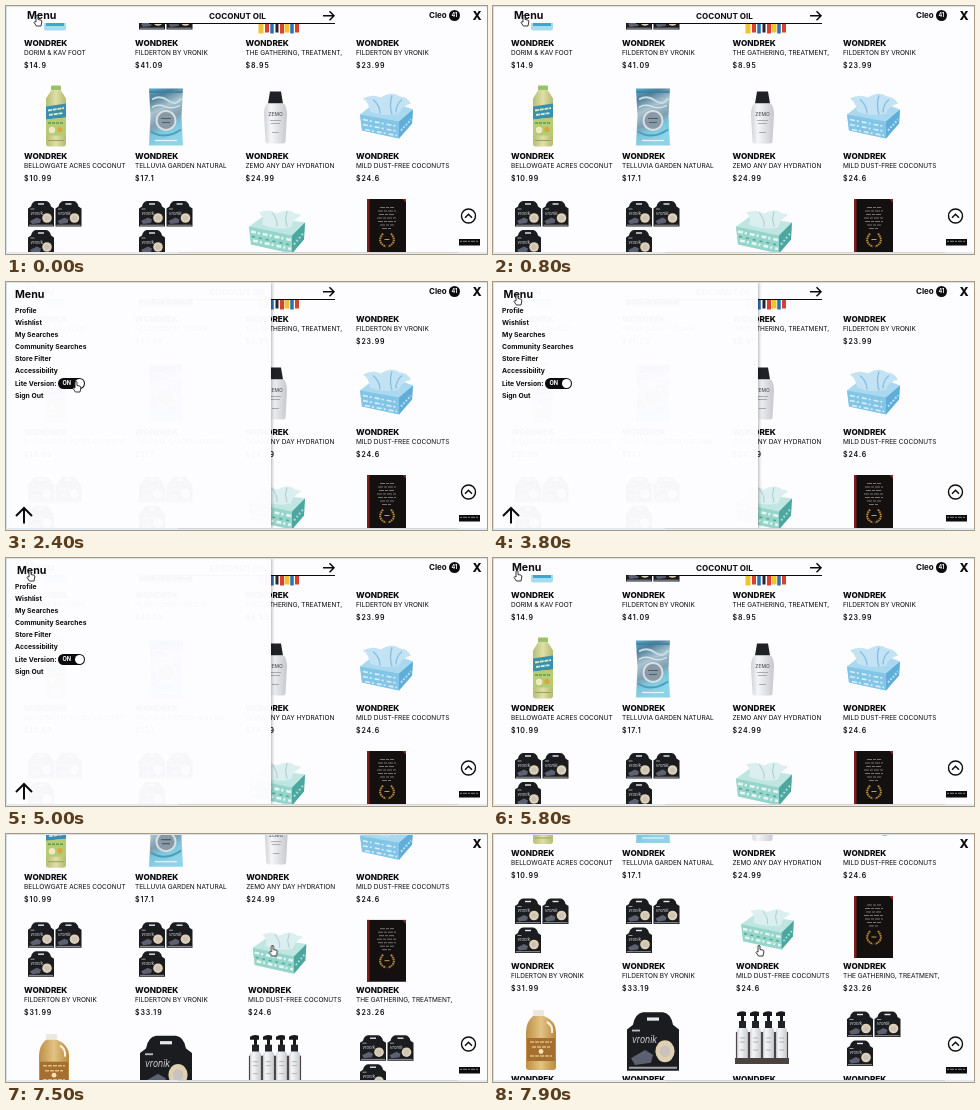
Write an HTML page that moves like this. It is 481 px wide and 248 px high and loops after 8000 ms.

```html
<!DOCTYPE html>
<html lang="en">
<head>
<meta charset="utf-8">
<title>Shop search</title>
<style>
@property --h { syntax: "<number>"; inherits: true; initial-value: 0; }
html, body { margin: 0; width: 100%; height: 100%; overflow: hidden; background: #fdfcfe; }
body { position: relative; font: 700 8px/10px Inter, Arial, sans-serif; color: #0b0b0d; white-space: nowrap; }
body *, .defs { position: absolute; }
svg { overflow: visible; }
svg * { position: static; }
.line { fill: none; stroke: #0b0b0d; stroke-width: 1.5; }

/* products */
#grid { inset: 0; animation: scroll 8s linear infinite; }
.card { width: 111px; height: 100px; transform: translateX(calc(var(--h) * 3.5px)); }
.card svg { left: 0; top: 0; width: 62px; height: 62px; transform: scale(calc(1 - var(--h) * .06)); }
.shop { top: 64px; font-size: 8.2px; font-weight: 800; }
.item { top: 74px; font-size: 6.5px; font-weight: 400; }
.price { top: 87px; font-size: 7px; font-weight: 600; letter-spacing: .85px; }
.hover-a { animation: hoverA 8s ease infinite; }
.hover-b { animation: hoverB 8s ease infinite; }
.hover-c { animation: hoverC 8s ease infinite; }
@keyframes scroll {
  0%, 88.1% { transform: translateY(.5px); }
  88.75% { transform: translateY(-10px); animation-timing-function: cubic-bezier(.3, .5, .6, 1); }
  97.5%, 100% { transform: translateY(-130px); }
}
@keyframes hoverA { 0%, 81.25% { --h: 0; } 83.75%, 85% { --h: 1; } 88.75% { --h: .28; } 90%, 100% { --h: 0; } }
@keyframes hoverB { 0%, 85% { --h: 0; } 88.5%, 91.5% { --h: 1; } 96%, 100% { --h: 0; } }
@keyframes hoverC { 0%, 92% { --h: 0; } 96%, 100% { --h: 1; } }

/* header */
#head { left: 0; right: 0; top: 0; height: 17px; background: #fdfcfe; animation: head 8s ease-in-out infinite; }
.menu { font-size: 10.6px; line-height: 12px; }
#head .menu { left: 18px; top: 4px; animation: nudge 8s ease infinite; }
#query { left: 143px; width: 186px; height: 13px; top: 3.5px; border-bottom: 1.5px solid #0b0b0d; }
#query span { left: 60px; top: 1px; font-size: 8.1px; }
#user { left: 423px; top: 4px; }
#count { left: 443px; top: 3.5px; width: 11px; height: 11px; border-radius: 50%; background: #0b0b0d; color: #fff; font-size: 5.5px; line-height: 11px; text-align: center; }
#close { left: 466.5px; top: 3.6px; font-size: 12px; line-height: 12px; font-weight: 800; }
@keyframes head { 0%, 89.4% { transform: none; } 92.5%, 100% { transform: translateY(-22px); } }
@keyframes nudge {
  0%, 18% { transform: translateX(3px); }
  20%, 72.5% { transform: translateX(1px); }
  75%, 100% { transform: none; }
}

/* side panel */
#panel { left: -4px; top: 0; bottom: 0; width: 0; overflow: hidden; background: rgba(253, 252, 255, .975); box-shadow: 1px 0 3px rgba(0, 0, 0, .3); animation: panel 8s ease-in-out infinite; }
#inner { left: 4px; top: 0; width: 265px; height: 248px; animation: inner 8s ease-in-out infinite; }
#inner .menu { left: 9px; top: 6.5px; animation: poke 8s ease infinite; }
#links { left: 9px; top: 23px; font-size: 6.8px; line-height: 12.1px; white-space: pre; }
#toggle { left: 52px; top: 96px; width: 27px; height: 11px; border-radius: 6px; background: #0b0b0d; color: #fff; font-size: 5.6px; line-height: 11.4px; text-indent: 4.5px; }
#toggle i { right: 1px; top: 1px; width: 9px; height: 9px; border-radius: 50%; background: #fff; }
@keyframes panel { 0%, 17.25% { width: 0; } 23.5%, 66.25% { width: 269px; } 72.5%, 100% { width: 0; } }
@keyframes inner {
  0%, 17.25% { transform: translateX(-24px); }
  23.5%, 66.25% { transform: none; }
  72.5%, 100% { transform: translateX(-24px); }
}
@keyframes poke { 0%, 46.25% { transform: none; } 48.75%, 100% { transform: translateX(2px); } }

/* window edges */
.edge { background: #cfe1ec; }

/* pointer */
#pointer { left: 0; top: 0; animation: move 8s ease-in-out infinite; }
#pointer path { fill: #fff; stroke: #222; stroke-width: .9; stroke-linejoin: round; }
#hand { animation: hand 8s step-end infinite; }
#arrow { animation: arrow 8s step-end infinite; }
@keyframes move {
  0%, 18.75% { transform: translate(32px, 15px); }
  20% { transform: translate(33px, 14px); }
  28.75%, 37.5% { transform: translate(71px, 105px); }
  46.25%, 73.75% { transform: translate(25px, 18px); }
  82.5% { transform: translate(160px, 110px); }
  86.5% { transform: translate(268px, 117px); }
  100% { transform: translate(267px, 117px); }
}
@keyframes hand { 0% { opacity: 1; } 17.5% { opacity: 0; } 28% { opacity: 1; } 37.5% { opacity: 0; } 45% { opacity: 1; } 75% { opacity: 0; } 81.25%, 100% { opacity: 1; } }
@keyframes arrow { 0% { opacity: 0; } 17.5% { opacity: 1; } 28% { opacity: 0; } 37.5% { opacity: 1; } 45% { opacity: 0; } 75% { opacity: 1; } 81.25%, 100% { opacity: 0; } }
</style>
</head>
<body>
<svg class="defs" width="0" height="0">
  <defs>
    <linearGradient id="foil" x2=".3" y2="1">
      <stop offset="0" stop-color="#58a9c8"/><stop offset=".2" stop-color="#4f7f98"/><stop offset=".42" stop-color="#a9c3cf"/>
      <stop offset=".65" stop-color="#7f9fb0"/><stop offset=".8" stop-color="#7cc6dd"/><stop offset="1" stop-color="#8fd3e8"/>
    </linearGradient>
    <linearGradient id="cream">
      <stop offset="0" stop-color="#cfd1d5"/><stop offset=".3" stop-color="#f6f6f8"/><stop offset="1" stop-color="#c6c8cd"/>
    </linearGradient>
    <linearGradient id="oil">
      <stop offset="0" stop-color="#b5bd72"/><stop offset=".5" stop-color="#dfdfa8"/><stop offset="1" stop-color="#b3ba70"/>
    </linearGradient>
    <linearGradient id="gold">
      <stop offset="0" stop-color="#bd8f45"/><stop offset=".5" stop-color="#e2c383"/><stop offset="1" stop-color="#b98a40"/>
    </linearGradient>

    <g id="pack">
      <path d="M3 6Q4 1 8 .5H18Q22 1 23 6L26 8V26H0V8Z" fill="#1b1c20"/>
      <path d="M10 3.5H16" stroke="#e8e8ea" stroke-width="1.4"/>
      <path d="M2.5 8.5h4" stroke="#b9bbc0" stroke-width=".8"/>
      <text x="2.5" y="14" font-size="4.3" font-style="italic" font-weight="400" fill="#ced0d5">vronik</text>
      <circle cx="19" cy="17.5" r="4.8" fill="#dfd0b2"/>
      <circle cx="19" cy="17.5" r="2.6" fill="#c9c2bd"/>
      <path d="M2 20.5 9 17 13 19 12 22.5 4 23.5Z" fill="#5c6070"/>
      <path d="M1 24.7H25" stroke="#a4a6ac" stroke-width=".9"/>
    </g>
    <g id="packs"><use href="#pack" x="4" y="1"/><use href="#pack" x="31.5" y="1"/><use href="#pack" x="4" y="30"/></g>
    <g id="packs4"><use href="#packs"/><use href="#pack" x="31.5" y="30"/></g>
    <use id="bigpack" href="#pack" transform="translate(5 1) scale(2 2.3)"/>

    <g id="bottle">
      <rect x="27" y="-1" width="10" height="5" rx="1" fill="#9cc266"/>
      <path d="M27 4H37L42 12V57Q42 60 39 60H25Q22 60 22 57V12Z" fill="url(#oil)"/>
      <path d="M22 20 42 17V31L22 33Z" fill="#3a8fae"/>
      <path d="M22 33 42 31V49H22Z" fill="#b5cc72"/>
      <path d="M24 24 40 21.5M25 28.5 39 26.5" stroke="#d9ecc0" stroke-width="1.8" stroke-dasharray="4 .8"/>
      <path d="M24 36.5H40" stroke="#5c9a4c" stroke-width="1.5" stroke-dasharray="3 1"/>
      <circle cx="28" cy="43.5" r="3.2" fill="#f0e9c4"/><circle cx="36" cy="43" r="2.6" fill="#dba63f"/>
      <path d="M24 54H40" stroke="#98a456"/>
    </g>
    <g id="pouch">
      <path d="M14 2H48L46.5 30 48 59H14L15.5 30Z" fill="url(#foil)"/>
      <path d="M14.5 5.5H47.5" stroke="#357fa2" stroke-width="1.6"/>
      <path d="M17 13Q25 8 33 14T46 12" fill="none" stroke="#c8dde6" stroke-width="2"/>
      <path d="M17 21Q23 17 30 20T45 19" fill="none" stroke="#dceaf0" stroke-width="1.2"/>
      <circle cx="31" cy="34" r="9.5" fill="#8a99a6" stroke="#d9dfe2" stroke-width="2"/>
      <path d="M26 32H36M27 36H35" stroke="#4d5d6b" stroke-width="1.2"/>
      <path d="M16 45Q30 54 46 43" fill="none" stroke="#4c9dbb" stroke-width="2"/>
      <path d="M20 54H42" stroke="#e5f5fa" stroke-width="1.2"/>
    </g>
    <g id="lotion">
      <path d="M24 5H35L37 17H22Z" fill="#202126"/>
      <path d="M21 17H38Q41 21 41 28L39.5 55Q39.5 57 37 57H22Q19.5 57 19.5 55L18 28Q18 21 21 17Z" fill="url(#cream)"/>
      <text x="29.5" y="29" text-anchor="middle" font-size="5" font-weight="500" fill="#55575d">ZEMO</text>
      <path d="M24 34H35M25 37H34M26 46H33" stroke="#999ca3" stroke-width=".8"/>
    </g>
    <g id="tissues">
      <path d="M4 28 14 20 44 18 57 23 56 37 43 52 6 44Z" fill="#a9d8ef"/>
      <path d="M4 28 43 35 43 52 6 44Z" fill="#82c5e7"/>
      <path d="M43 35 57 23 56 37 43 52Z" fill="#5fadd9"/>
      <path d="M14 25Q13 16 7 12 16 7 25 11 36 4 44 10 51 10 55 17 46 19 43 27 28 31 14 25Z" fill="#c3e2f3"/>
      <path d="M17 13Q24 19 24 27M36 9Q33 18 36 28M46 13Q40 18 40 26" fill="none" stroke="#86bfe0" stroke-width="1.3"/>
      <path d="M7 33 42 40M7 38 42 45M9 43 41 49" stroke="#d9eef9" stroke-width="1.6" stroke-dasharray="5 2 2 3"/>
      <path d="M45 44 55 33" stroke="#b9def1" stroke-width="2" stroke-dasharray="2 1.5"/>
    </g>
    <g id="teabox">
      <path d="M3 27 17 17 59 23 58 40 46 54 5 45Z" fill="#bfe6e0"/>
      <path d="M3 27 46 36 46 54 5 45Z" fill="#96d5cb"/>
      <path d="M46 36 59 23 58 40 46 54Z" fill="#4ba79f"/>
      <path d="M16 25Q19 18 13 13 24 9 31 14 43 8 49 14 54 14 55 16 47 20 45 28 30 31 16 25Z" fill="#dbeef0"/>
      <path d="M26 13Q32 20 31 27M41 12Q38 19 41 27" fill="none" stroke="#a9cdd2"/>
      <path d="M5 32 45 40.5M7 41 45 49.5" stroke="#e4f6ef" stroke-width="2.6" stroke-dasharray="5 2 2 3"/>
      <path d="M6 37 45 45.5" stroke="#4fa892" stroke-width="1.4" stroke-dasharray="3 4"/>
      <path d="M48 45 57 34" stroke="#a9dcd3" stroke-width="2" stroke-dasharray="2 2"/>
    </g>
    <g id="book">
      <path d="M11-1H50V61H11Z" fill="#14100f"/><path d="M11-1H13.5V61H11Z" fill="#7a211c"/>
      <path d="M46-1H50V3Z" fill="#8c2a22"/>
      <path d="M24 8H38M22 11.5H40M23 15H39M21 18.5H41M22 22H40M24 25.5H38M26 29H36" stroke="#77716f" stroke-width="1" stroke-dasharray="5 1 3 1"/>
      <path d="M27 34Q20 43 30 47M35 34Q42 43 32 47" fill="none" stroke="#b98a3c" stroke-width="2" stroke-dasharray="1.6 .7"/>
      <path d="M28.5 40H33.5" stroke="#c59b52"/>
    </g>
    <g id="jug">
      <rect x="22" y="0" width="11" height="6" rx="1" fill="#ece8df"/>
      <path d="M22 6H33Q45 11 45 22V57Q45 60 42 60H18Q15 60 15 57V22Q15 12 22 6Z" fill="url(#gold)"/>
      <path d="M36 12Q42 15 41 23" fill="none" stroke="#fbf4e2" stroke-width="2"/>
      <rect x="16" y="28" width="28" height="23" fill="#a5702f"/>
      <path d="M19 32H41M21 37H39M19 46H41" stroke="#e0bd7d" stroke-width="1.4" stroke-dasharray="4 1"/>
      <circle cx="30" cy="41.5" r="2.4" fill="#f2e4b8"/>
    </g>
    <g id="pump">
      <path d="M1 3Q5 0 10 2V6H8V13H5V6H1Z" fill="#17181b"/><rect x="3" y="11" width="7" height="7" fill="#222328"/>
      <path d="M2 18H11L12.5 22V49H.5V22Z" fill="url(#cream)"/>
      <path d="M.5 22V50M12.5 22V50" stroke="#4c4745" stroke-width="1.2"/>
      <path d="M4 28H9M4 32H9M4 40H9" stroke="#a5a6aa" stroke-width=".8"/>
    </g>
    <g id="pumps">
      <use href="#pump" x="3"/><use href="#pump" x="16"/><use href="#pump" x="29"/><use href="#pump" x="42"/>
      <rect x="2" y="48" width="54" height="6" fill="#4b4340"/>
    </g>
    <g id="jar"><rect x="20" y="43" width="22" height="14" rx="2" fill="#a5dded"/><path d="M22 51H40" stroke="#3fa5cf" stroke-width="3"/></g>
    <g id="pens">
      <path d="M15 0V60M41 0V59" stroke="#f0c431" stroke-width="5"/>
      <path d="M21 0V59M36 0V60M51 0V59" stroke="#d8402f" stroke-width="4"/>
      <path d="M26 0V60M46 0V60" stroke="#2b6fb5" stroke-width="3.5"/>
      <path d="M31 0V59" stroke="#2a2528" stroke-width="3"/>
    </g>
  </defs>
</svg>

<div id="grid"></div>

<div id="head">
  <div class="menu">Menu</div>
  <div id="query"><span>COCONUT OIL</span></div>
  <svg style="left:0;top:0" width="1" height="1"><path class="line" d="M317 9.7H328M323.5 5.2 328 9.7 323.5 14.2"/></svg>
  <div id="user">Cleo</div>
  <div id="count">41</div>
</div>
<div id="close">X</div>

<svg style="left:0;top:0" width="1" height="1">
  <circle cx="462.5" cy="210" r="7" fill="#fff" stroke="#0b0b0d" stroke-width="1.4"/>
  <path class="line" d="M459 211.8 462.5 208.3 466 211.8"/>
  <rect x="453" y="233" width="21" height="6.5" fill="#0b0b0d"/>
  <path d="M454 235.3H473" stroke="#a5a5aa" stroke-width=".8" stroke-dasharray="2 1 4 1"/>
</svg>

<div id="panel"><div id="inner">
  <div class="menu">Menu</div>
  <div id="links">Profile
Wishlist
My Searches
Community Searches
Store Filter
Accessibility
Lite Version:
Sign Out</div>
  <div id="toggle">ON<i></i></div>
  <svg style="left:0;top:0" width="1" height="1"><path class="line" style="stroke-width:2" d="M18 241.5V226M10 234 18 226 26 234"/></svg>
</div></div>

<div class="edge" style="left:0;top:0;width:481px;height:1px"></div>
<div class="edge" style="left:0;top:0;width:1px;height:248px"></div>
<div class="edge" style="left:0;top:246px;width:481px;height:2px;background:#e3eaf0"></div>
<div class="edge" style="left:172px;top:246px;width:280px;height:1px;background:#d3d6db"></div>

<svg id="pointer" width="1" height="1">
  <path id="hand" d="M-2-5Q-1-6.2 0-5V-1.5L3.2-.8Q4-.4 3.8 1L3 5H-1.6L-4 1.4Q-3.6 0-2 1Z"/>
  <path id="arrow" d="M-2-4V4.5L0 2.7 1.3 5.6 2.6 5 1.4 2.2H4Z"/>
</svg>

<script>
const SHOP = "WONDREK";
const RAZOR = "FILDERTON BY VRONIK";
const TISSUE = "MILD DUST-FREE COCONUTS";
const BOOK = "THE GATHERING, TREATMENT,";
const columns = [18, 129, 239.5, 350];

// art, item, price, hover class
const products = [
  ["jar", "DORIM & KAV FOOT", "14.9"], ["packs4", RAZOR, "41.09"],
  ["pens", BOOK, "8.95"], ["", RAZOR, "23.99"],
  ["bottle", "BELLOWGATE ACRES COCONUT", "10.99"], ["pouch", "TELLUVIA GARDEN NATURAL", "17.1", "hover-a"],
  ["lotion", "ZEMO ANY DAY HYDRATION", "24.99", "hover-b"], ["tissues", TISSUE, "24.6"],
  ["packs", RAZOR, "31.99"], ["packs", RAZOR, "33.19"],
  ["teabox", TISSUE, "24.6", "hover-c"], ["book", BOOK, "23.26"],
  ["jug", "", ""], ["bigpack", "", ""], ["pumps", "", ""], ["packs", "", ""]
];

document.getElementById("grid").innerHTML = products.map(([art, item, price, hover = ""], i) => `
  <div class="card ${hover}" style="left:${columns[i % 4]}px;top:${-33 + 113 * (i >> 2)}px">
    <svg>${art && `<use href="#${art}"/>`}</svg>
    <div class="shop">${SHOP}</div>
    <div class="item">${item.replace("&", "&amp;")}</div>
    <div class="price">${price && "$" + price}</div>
  </div>`).join("");
</script>
</body>
</html>
```
